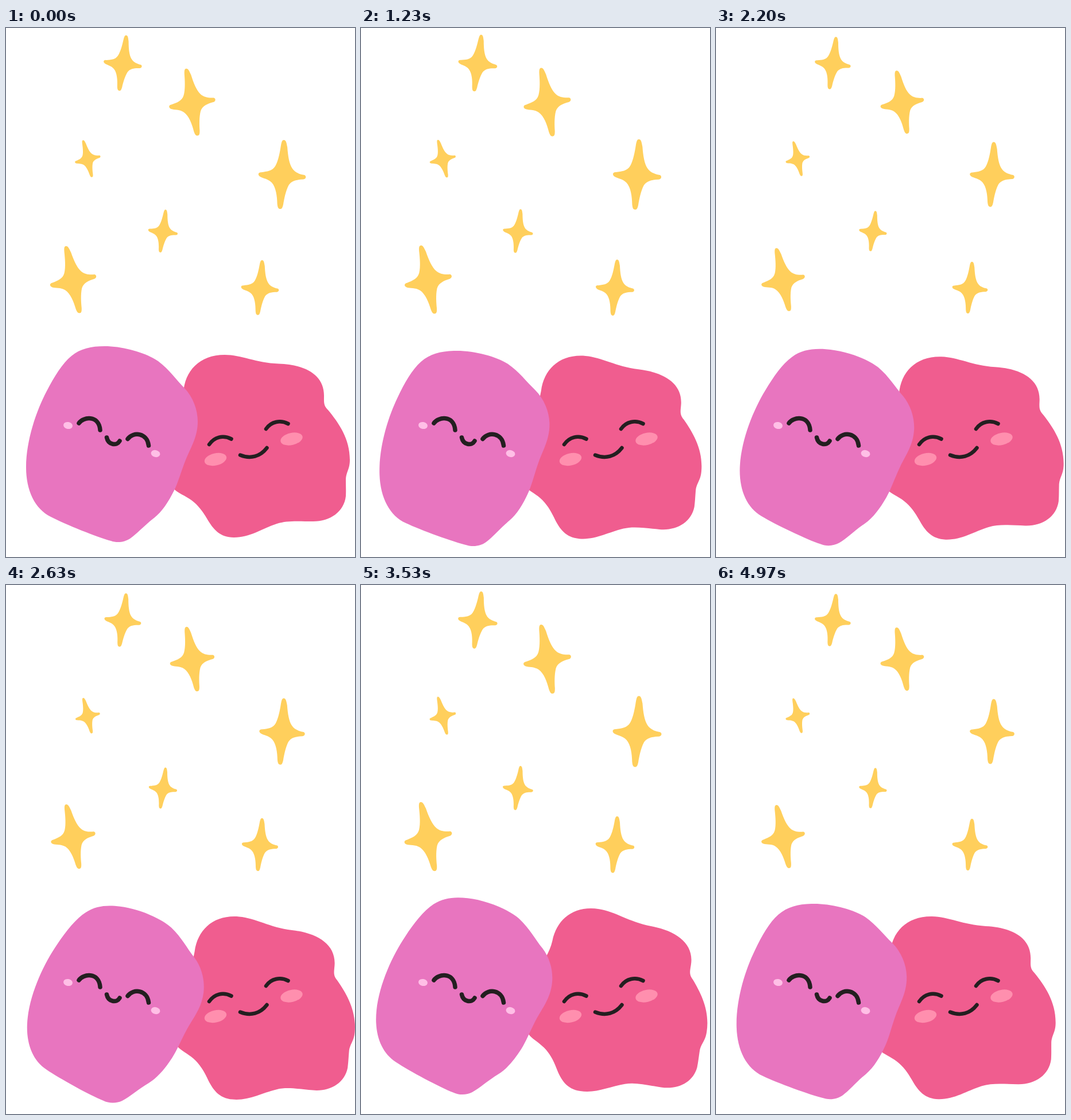
An HTML page for the animation above (5010 ms loop, 608 by 921 pixels).

```html
<!DOCTYPE html>
<html lang="en">
<head>
<meta charset="utf-8">
<title>Happy blobs</title>
<style>
  html, body { margin: 0; width: 100%; height: 100%; overflow: hidden; background: #fff; }
  svg { display: block; width: 100vw; height: 100vh; }
  .ink { fill: none; stroke: #231f20; stroke-linecap: round; }
</style>
</head>
<body>
<svg viewBox="0 0 608 921">
  <defs>
    <path id="star" d="M0-63C4-63 5-58 7-50C9-34 12-20 18-12C23-5 32-2 41-1C45 1 44 6 39 7C28 8 18 10 13 19C8 30 6 45 5 54C4 60 3 63 0 63C-4 63-5 60-6 54C-7 40-10 24-18 16C-25 9-35 9-40 6C-45 3-44-2-38-2C-28-4-18-5-13-15C-8-25-6-42-5-52C-4-60-3-63 0-63Z"/>
  </defs>
  <g id="stars" fill="#ffcf5c"></g>
  <path id="red" fill="#f05d8f" d="M381 569C410 569 435 583 475 584.5C520 586 554 603 554 640C554 652 553 657 561 665C580 688 599 715 599 752C599 768 593 772 592 785C592 798 592.5 805 592 815C589 842 565 859 535 859C510 859 490 857 472 863C445 872 425 887 397 887C373 887 361 873 350 854C343 842 335 831 323 822C312 814 300 810 293 803C282 792 272 775 272 745C272 705 306 680 309 636C311 597 337 569 381 569Z"/>
  <path id="purple" fill="#e875bf" d="M172 554C205 554 245 566 265 580C285 595 296 612 311 627C326 643 334 665 334 685C334 712 322 730 313 752C305 772 300 791 293 805C283 825 272 842 258 853C241 866 228 881 216 889C207 895 194 897 183 893C160 887 103 864 78 851C50 837 35 805 35 765C35 718 53 666 71 632C84 607 98 584 114 571C130 558 148 554 172 554Z"/>
  <g fill="#ffbfe6">
    <ellipse rx="8" ry="6" transform="translate(108 692) rotate(10)"/>
    <ellipse rx="8" ry="6" transform="translate(260.5 741) rotate(15)"/>
  </g>
  <g fill="#ff8fae">
    <ellipse rx="19.5" ry="10.5" transform="translate(365 751) rotate(-13)"/>
    <ellipse rx="19.5" ry="10.5" transform="translate(497.5 715.5) rotate(-13)"/>
  </g>
  <path class="ink" stroke-width="7.5" d="M127 688C134 677 162 673 164 700M212 715.5C222 702 246 705 248.5 727M175.5 713C178 726 193 728 198 719"/>
  <path class="ink" stroke-width="6.5" d="M354 725C363 712 378 708 392.5 715.5M453 698C462 685 478 682 491.5 689M408 743.5C426 751 443 746 454.5 731"/>
</svg>
<script>
const LOOP = 5010, FRAME = 33.35, LAST = 149;

// x, y, size, tilt
const stars = [
  [203.5, 61, .81, 7], [324, 129, .985, -10], [142, 227.5, .55, -14], [481, 255, 1, 3],
  [273.5, 353.5, .625, 7], [116.5, 438, .99, -12], [442.5, 452, .797, 4.5]
];

// Each blob drifts around its centre; key values are evenly spaced over the loop
const blobs = [
  { id: 'purple', cx: 185, cy: 725,
    x: [0, -13, -4, 11, 6, 8.5, -9, -5, -.5],
    y: [0, -4, 7.5, 3.5, 7, 0, -10, 2, .5],
    turn: [0, 1.5, -2, .4, 6, 8, 5, 1.5, -1.8] },
  { id: 'red', cx: 448, cy: 728,
    x: [0, 8, -3.5, 3.5, 10, 13, 6, -3, -7],
    y: [0, 2, 7, -4, 13, 9, 1.3, -4.5, 9],
    turn: [0, 3, 4.8, -.3, 4, 7.5, 9, 7.5, .8] }
];

const el = id => document.getElementById(id);
el('stars').innerHTML = stars.map(() => '<use href="#star"/>').join('');
const starEls = [...el('stars').children];

// Catmull-Rom curve through evenly spaced keys, u from 0 to 1
function curve(keys, u) {
  const end = keys.length - 1, i = Math.min(end - 1, Math.floor(u * end)), t = u * end - i;
  const b = keys[i], c = keys[i + 1], a = keys[i - 1] ?? b, d = keys[i + 2] ?? c;
  return b + t / 2 * (c - a + t * (2 * a - 5 * b + 4 * c - d + t * (3 * (b - c) + d - a)));
}

// Four full beats and a short, weak one in every half loop
function beat(f) {
  const p = f % 75 - 2.5, full = 15.8, weak = p > 4 * full;
  const length = weak ? full / 2 : full, height = weak ? .065 : .13;
  return .895 + height * (1 - Math.cos(2 * Math.PI * p / length));
}

function draw(time) {
  const f = Math.min(LAST, Math.floor((time % LOOP + 8) / FRAME));
  const s = beat(f);
  stars.forEach(([x, y, size, tilt], i) =>
    starEls[i].setAttribute('transform', `translate(${x} ${y}) rotate(${tilt}) scale(${size * s})`));
  for (const { id, cx, cy, ...keys } of blobs) {
    const [x, y, turn] = [keys.x, keys.y, keys.turn].map(k => curve(k, f / LAST));
    el(id).setAttribute('transform', `translate(${x} ${y}) rotate(${turn} ${cx} ${cy})`);
  }
}

let start;
function tick(now) {
  start ??= now;
  draw(now - start);
  requestAnimationFrame(tick);
}
draw(0);
requestAnimationFrame(tick);
</script>
</body>
</html>
```
